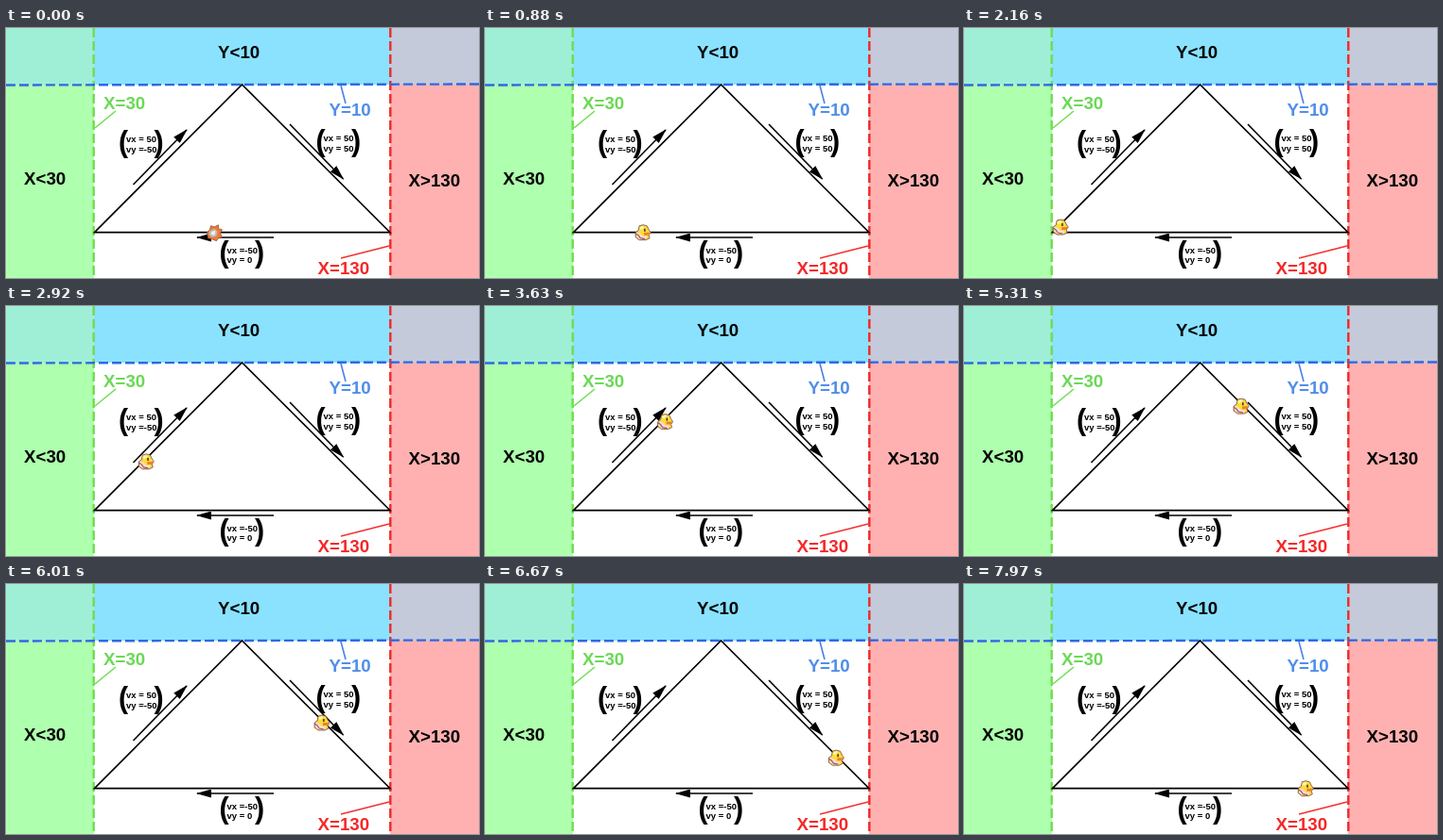
An HTML page for the animation above (8 s loop, 500x265 px).

```html
<!DOCTYPE html>
<html lang="en">
<head>
<meta charset="utf-8">
<title>Triangle path</title>
<style>
  html, body { margin: 0; width: 100%; height: 100%; overflow: hidden; background: #fff; }
  svg { display: block; width: 100vw; height: 100vh; }
  text { font: bold 18.7px "Liberation Sans", Arial, sans-serif; }
  .small { font-size: 9.5px; white-space: pre; }
  .paren { font-size: 30.5px; }
  .line { fill: none; stroke: #000; stroke-width: 1.6; }
  .arrow { marker-end: url(#head); }
  .dash { fill: none; stroke-width: 2.4; stroke-dasharray: 10 4; }
  .leader { stroke-width: 1.6; }
</style>
</head>
<body>
<svg viewBox="0 0 500 265">
  <defs>
    <marker id="head" markerUnits="userSpaceOnUse" markerWidth="16" markerHeight="9"
            refX="15" refY="4.5" orient="auto">
      <path d="M0 0L16 4.5L0 9Z"/>
    </marker>
    <g id="creature" stroke-linejoin="round">
      <path d="M-8 0L-5-2L-4-7L0-8L4-7L6-3L8 0L6 3L7 6L3 8H-4L-8 5Z"
            fill="#ffdc38" stroke="#6b4150" stroke-width=".8"/>
      <path d="M-7 0L-3 1L0 4L4 4L3 7H-4L-7 4Z" fill="#f6dfe0"/>
      <path d="M-8 1L-5 3L-3 6L2 7" fill="none" stroke="#a0506a" stroke-width="1.2"/>
      <path d="M1 0L8 0L6 3H1Z" fill="#f08030"/>
      <path d="M-4-5L0-7L1-5L-2-3Z" fill="#fff6c0"/>
      <path d="M1-4h1.500v3H1z" fill="#382b35"/>
    </g>
    <g id="ruffled" stroke-linejoin="round">
      <path d="M-8 0L-5-3L-4-7L0-6L4-8L4-4L8-3L6 1L8 5L4 6L2 9L-3 7L-7 6Z"
            fill="#f27a35" stroke="#804b32" stroke-width=".7"/>
      <path d="M-5-2L0-4L3-1L2 4L-3 5L-6 2Z" fill="#b9bec2"/>
      <path d="M-3-1L1-2L0 3L-4 2Z" fill="#f3eee8"/>
    </g>
  </defs>

  <path d="M0 0H93V60H0Z" fill="#9fefd7"/>
  <path d="M93 0H406V60H93Z" fill="#8ae2ff"/>
  <path d="M406 0H500V60H406Z" fill="#c5cada"/>
  <path d="M0 60H93V265H0Z" fill="#aeffae"/>
  <path d="M406 60H500V265H406Z" fill="#ffb1b1"/>

  <path class="dash" stroke="#70dc50" d="M92.700 0V265"/>
  <path class="dash" stroke="#f02828" d="M406.300 0V265"/>
  <path class="dash" stroke="#2f68e6" d="M0 60.500L500 59.500"/>

  <path class="leader" stroke="#70dd55" d="M116 88L94 106"/>
  <path class="leader" stroke="#4a80e8" d="M354 61L359 80"/>
  <path class="leader" stroke="#f53030" d="M405 231L354 244"/>

  <path class="line" d="M93.500 216.600L249.500 60L406 216.600Z"/>
  <path class="line arrow" d="M134.500 166L191 108"/>
  <path class="line arrow" d="M300 102L356.500 160"/>
  <path class="line arrow" d="M283 222H202"/>

  <text x="224" y="31.500">Y&lt;10</text>
  <text x="19" y="166">X&lt;30</text>
  <text x="425.500" y="168">X&gt;130</text>
  <text x="103" y="86">
    <tspan fill="#6bd955">X=30</tspan>
  </text>
  <text x="341.500" y="93" fill="#508eea">Y=10</text>
  <text x="329.500" y="261.300" fill="#f52828">X=130</text>
  <g id="vectors"></g>
  <g id="sprite"><use id="look" href="#creature"/></g>
</svg>
<script>
  const LOOP = 8000, STEP = LOOP / 126;
  // Waypoints: time in ms, then the centre of the sprite.
  const path = [
    [0, 220.5, 216.7], [2065, 96.5, 216.7], [4600, 250, 63.2],
    [7222, 404, 216.7], [LOOP, 357.5, 216.7]
  ];

  const vector = (x, y, vx, vy) => `
    <text class="paren" x="${x - 8}" y="${y + 9.5}">(</text>
    <text class="small" x="${x}" y="${y}">${vx}</text>
    <text class="small" x="${x}" y="${y + 10.5}">${vy}</text>
    <text class="paren" x="${x + 29.5}" y="${y + 9.5}">)</text>`;

  document.getElementById("vectors").innerHTML =
    vector(127, 121, "vx = 50", "vy =-50") +
    vector(335.5, 120, "vx = 50", "vy = 50") +
    vector(233.5, 238.5, "vx =-50", "vy = 0");

  const sprite = document.getElementById("sprite");
  const look = document.getElementById("look");

  function positionAt(time) {
    const i = path.findIndex(point => point[0] > time);
    const [t0, x0, y0] = path[i - 1], [t1, x1, y1] = path[i];
    const k = (time - t0) / (t1 - t0);
    return [x0 + (x1 - x0) * k, y0 + (y1 - y0) * k];
  }

  function draw() {
    const time = performance.now() % LOOP;
    const step = Math.min(125, Math.floor((time + 25) / STEP));
    const [x, y] = positionAt(step * STEP);
    sprite.setAttribute("transform", `translate(${x} ${y})`);
    look.setAttribute("href", step ? "#creature" : "#ruffled");
    requestAnimationFrame(draw);
  }
  draw();
</script>
</body>
</html>
```
